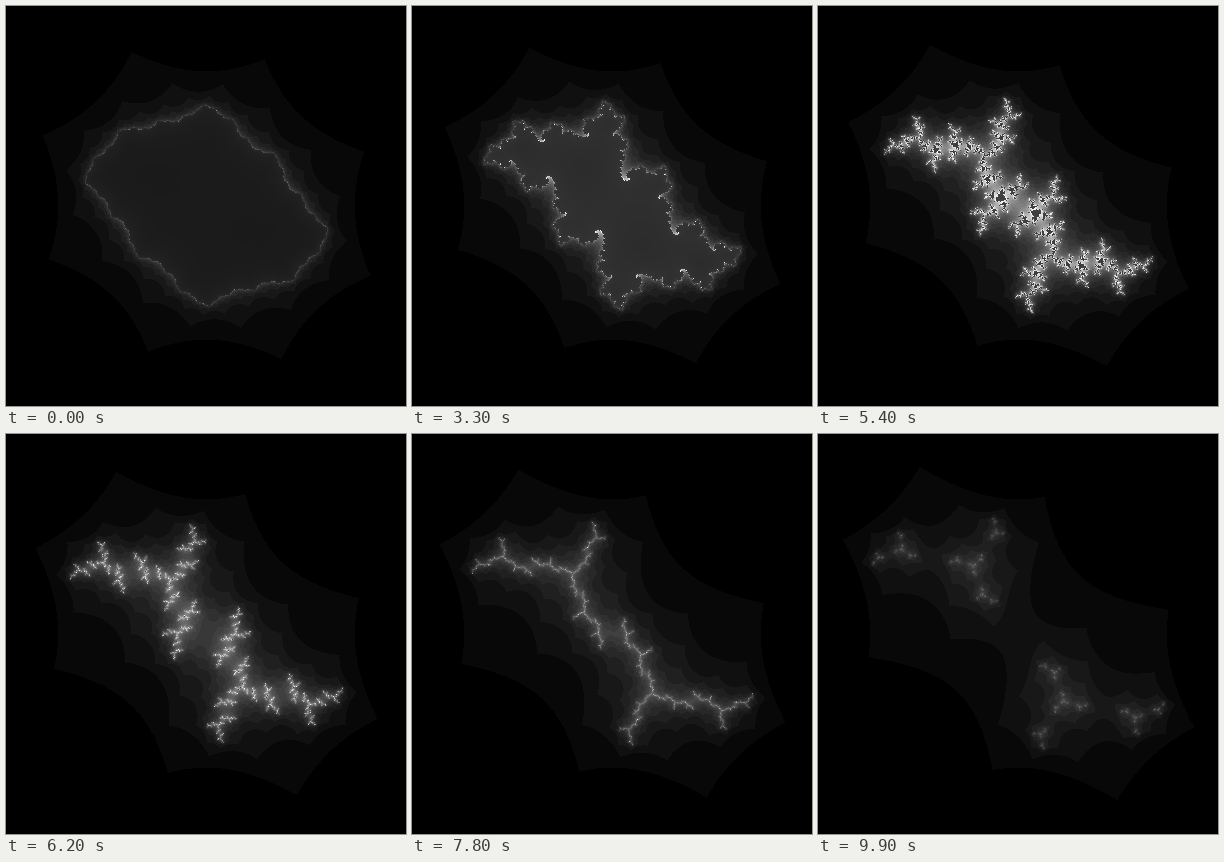
Recreate the animation shown at these times as an HTML page with a canvas. Size 400 px wide and 400 px high, loop 10000 ms.

```html
<!DOCTYPE html>
<html>
<head>
<meta charset="utf-8">
<title>Julia set</title>
<style>
html, body { margin: 0; width: 100%; height: 100%; overflow: hidden; background: #000; }
canvas { display: block; }
</style>
</head>
<body>
<canvas id="stage" width="400" height="400"></canvas>
<script>
const SIZE = 400, STEPS = 100, STEP_MS = 100, MAX_ITER = 32;
const ctx = document.getElementById('stage').getContext('2d');
const image = ctx.createImageData(SIZE, SIZE);
const pixels = new Uint32Array(image.data.buffer);

// Outside: escape count from the square |x|, |y| < 2. Inside: mean orbit radius.
function shade(x, y, cx, cy) {
  let sum = 0;
  for (let n = 0; n < MAX_ITER; n++) {
    const nextX = x * x - y * y + cx;
    y = 2 * x * y + cy;
    x = nextX;
    if (Math.abs(x) > 2 || Math.abs(y) > 2) return n * 8;
    sum += Math.sqrt(x * x + y * y);
  }
  return Math.min(255, Math.round(sum / MAX_ITER * 90));
}

function draw(step) {
  const cx = -0.2, cy = 0.3 + step * 0.01;
  for (let row = 0, i = 0; row < SIZE; row++) {
    for (let col = 0; col < SIZE; col++, i++) {
      const grey = shade((col - 200) / 100, (199 - row) / 100, cx, cy);
      pixels[i] = 0xff000000 | grey * 0x010101;
    }
  }
  ctx.putImageData(image, 0, 0);
}

let shown = -1;
const start = performance.now();
function tick() {
  const elapsed = performance.now() - start;
  const step = Math.floor(elapsed / STEP_MS) % STEPS;
  if (step !== shown) draw(shown = step);
  requestAnimationFrame(tick);
}
tick();
</script>
</body>
</html>
```
